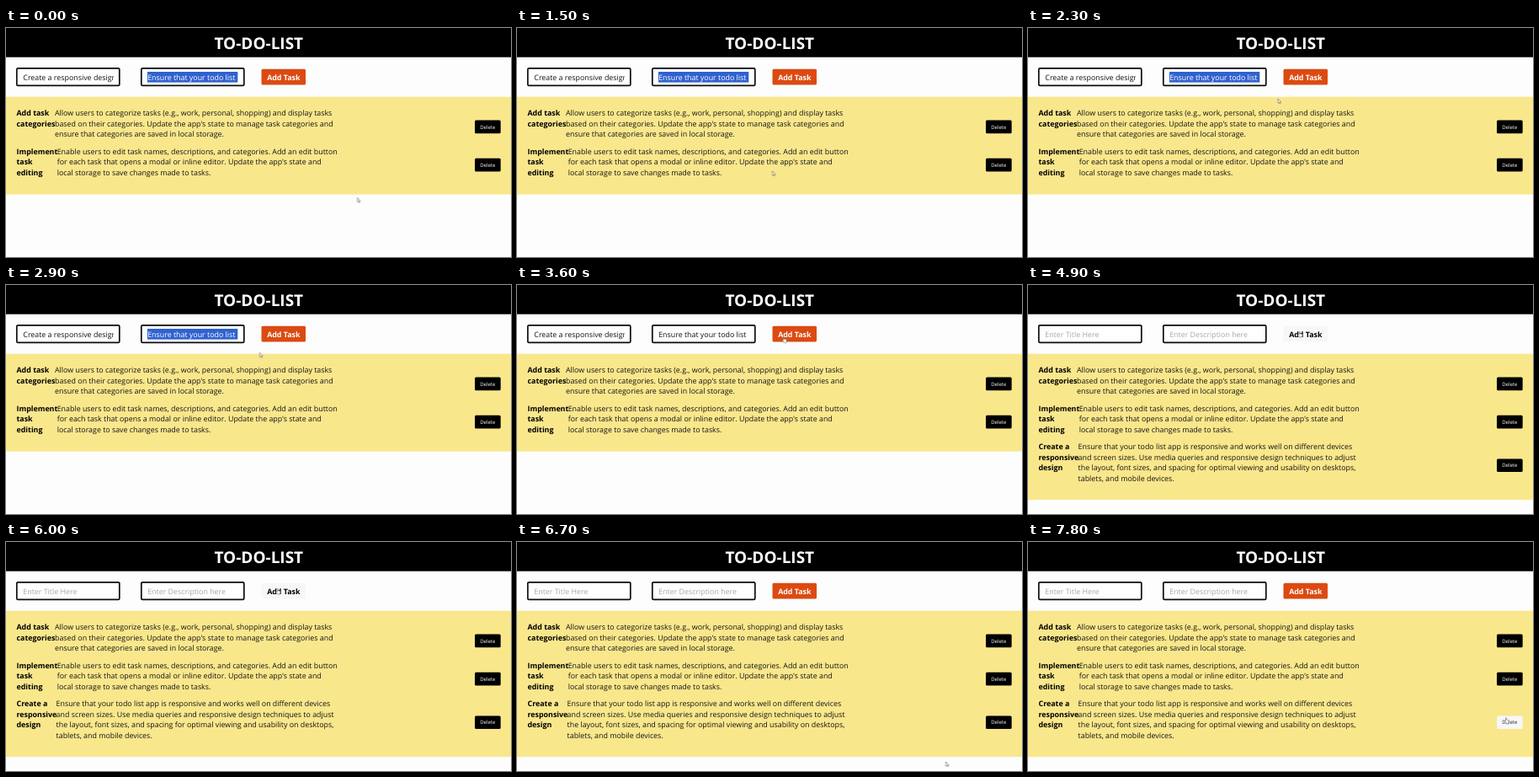
These frames come from a looping animation (600 by 272 pixels, 8 s). An HTML page:

```html
<!DOCTYPE html>
<html lang="en">
<head>
<meta charset="utf-8">
<title>To-do list</title>
<style>
  html, body { margin: 0; width: 100%; height: 100%; overflow: hidden; background: #fdfdfd; }
  svg { display: block; width: 600px; height: 272px; }
  text {
    font: 8.87px "Open Sans", "Noto Sans", sans-serif;
    text-rendering: geometricPrecision;
    fill: #141414;
    white-space: pre;
  }
  .bold text, text.bold { font-weight: 700; fill: #000; }
  text.title { font-size: 19px; font-weight: 700; fill: #fff; text-anchor: middle; }
  .field { fill: #fff; stroke: #0c0c0c; stroke-width: 1.7; }
  text.hint { fill: #a8a8a8; }
  text.mini { font-size: 6px; fill: #fff; text-anchor: middle; }
  text.label { font-weight: 700; text-anchor: middle; fill: #fff; }
  text.marked { fill: #fff; }

  .before, .after, .selected, .plain, .panel, .arrow, .hand {
    animation: 8s step-end infinite;
  }
  .before { animation-name: before; }
  .after { animation-name: after; }
  .selected { animation-name: selected; }
  .plain { animation-name: plain; }
  .panel { animation-name: grow; }
  .arrow { animation-name: arrow; }
  .hand { animation-name: hand; }
  .add { animation: add 8s linear infinite; }
  text.label { animation: addText 8s linear infinite; }
  .last { animation: last 8s linear infinite; }
  text.lastText { animation: lastText 8s linear infinite; }
  .cursor { animation: move 8s linear infinite; }

  @keyframes before { 0% { visibility: visible } 61.25%, 100% { visibility: hidden } }
  @keyframes after { 0% { visibility: hidden } 61.25%, 100% { visibility: visible } }
  @keyframes selected { 0% { visibility: visible } 41.25%, 100% { visibility: hidden } }
  @keyframes plain { 0% { visibility: hidden } 41.25%, 100% { visibility: visible } }
  @keyframes grow { 0% { height: 116px } 61.25%, 100% { height: 173.5px } }
  @keyframes arrow {
    0% { visibility: visible } 44.5% { visibility: hidden }
    78.7% { visibility: visible } 94.5%, 100% { visibility: hidden }
  }
  @keyframes hand {
    0% { visibility: hidden } 44.5% { visibility: visible }
    78.7% { visibility: hidden } 94.5%, 100% { visibility: visible }
  }
  @keyframes add { 0%, 45.2% { fill: #dc4a12 } 47.5%, 78.5% { fill: #f7f7f7 } 80.5%, 100% { fill: #dc4a12 } }
  @keyframes addText { 0%, 45.2% { fill: #fff } 47.5%, 78.5% { fill: #000 } 80.5%, 100% { fill: #fff } }
  @keyframes last { 0%, 94.5% { fill: #000 } 96.5%, 100% { fill: #f7f7f7 } }
  @keyframes lastText { 0%, 94.5% { fill: #fff } 96.5%, 100% { fill: #222 } }
  @keyframes move {
    0%, 6.25% { transform: translate(417.5px, 201.5px) }
    10% { transform: translate(398px, 236px) }
    14% { transform: translate(345px, 212px) }
    18.75% { transform: translate(303.5px, 170px) }
    24% { transform: translate(300px, 122px) }
    28.75% { transform: translate(297px, 84px) }
    37% { transform: translate(302px, 80px) }
    45% { transform: translate(316px, 61.5px) }
    53.75%, 58.7% { transform: translate(320px, 56px) }
    58.75%, 77.5% { transform: translate(321.5px, 55px) }
    79.5% { transform: translate(385px, 120px) }
    83.75% { transform: translate(509.5px, 261px) }
    88% { transform: translate(529px, 249px) }
    94% { transform: translate(563px, 218px) }
    97.5%, 100% { transform: translate(567px, 208.5px) }
  }
</style>
</head>
<body>
<svg viewBox="0 0 600 272">
  <defs>
    <clipPath id="clip1"><rect x="20" y="50" width="108" height="17"/></clipPath>
    <clipPath id="clip2"><rect x="167.5" y="50" width="108" height="17"/></clipPath>
  </defs>

  <rect width="600" height="34.7"/>
  <text class="title" x="300.3" y="25.4">TO-DO-LIST</text>

  <rect class="field" x="12.8" y="47.8" width="122" height="20.6" rx="1.5"/>
  <rect class="field" x="160.8" y="47.8" width="122" height="20.6" rx="1.5"/>
  <g class="before">
    <text x="20.3" y="61.8" clip-path="url(#clip1)">Create a responsive design</text>
  </g>
  <g class="before">
    <g class="selected">
      <rect x="168" y="52" width="107.3" height="12.6" fill="#2f62cf"/>
      <text class="marked" x="168.2" y="61.8" clip-path="url(#clip2)">Ensure that your todo list </text>
    </g>
  </g>
  <g id="typed">
    <text x="168.2" y="61.8" clip-path="url(#clip2)">Ensure that your todo list </text>
  </g>
  <g class="after">
    <text class="hint" x="20.3" y="61.8">Enter Title Here</text>
    <text class="hint" x="168.2" y="61.8">Enter Description here</text>
  </g>
  <rect class="add" x="303.5" y="48.7" width="52.5" height="18.8" rx="1.5"/>
  <text class="label" x="329.8" y="61.8">Add Task</text>

  <rect class="panel" y="81.7" width="600" height="116" fill="#f9e78c"/>
  <g id="tasks"></g>

  <g class="cursor">
    <path class="arrow" d="M0 0V5.2L1.2 4.2 2 6 2.8 5.6 2.1 4H3.6Z" fill="#fff" stroke="#555" stroke-width=".55"/>
    <path class="hand" d="M.4.5Q1-.2 1.5.5V2.8L4 3.3Q4.7 3.6 4.5 4.5L4 7H1.2L-.9 4.3Q-.9 3.5.4 4.1Z" fill="#fff" stroke="#444" stroke-width=".5"/>
  </g>
</svg>
<style>
  #typed { animation: typed 8s step-end infinite; }
  @keyframes typed { 0% { visibility: hidden } 41.25% { visibility: visible } 61.25%, 100% { visibility: hidden } }
  .before .selected { animation-name: marked; }
  @keyframes marked { 0% { visibility: visible } 41.25%, 100% { visibility: hidden } }
</style>
<script>
  const PITCH = 12.6;
  const tasks = [
    { y: 104.2, x: 58, button: 109.6, name: ["Add task", "categories"], text: [
      "Allow users to categorize tasks (e.g., work, personal, shopping) and display tasks",
      "based on their categories. Update the app's state to manage task categories and",
      "ensure that categories are saved in local storage."] },
    { y: 149.5, x: 60.7, button: 154.8, name: ["Implement", "task", "editing"], text: [
      "Enable users to edit task names, descriptions, and categories. Add an edit button",
      "for each task that opens a modal or inline editor. Update the app's state and",
      "local storage to save changes made to tasks."] },
    { y: 194.9, x: 59.6, button: 206.4, name: ["Create a", "responsive", "design"], text: [
      "Ensure that your todo list app is responsive and works well on different devices",
      "and screen sizes. Use media queries and responsive design techniques to adjust",
      "the layout, font sizes, and spacing for optimal viewing and usability on desktops,",
      "tablets, and mobile devices."] }
  ];

  const lines = (list, x, y, cls = "") => list.map((s, i) =>
    `<text class="${cls}" x="${x}" y="${(y + i * PITCH).toFixed(1)}">${s}</text>`).join("");

  document.getElementById("tasks").innerHTML = tasks.map((t, i) => {
    const last = i === tasks.length - 1;
    return `<g class="${last ? "after" : ""}">
      ${lines(t.name, 12.5, t.y, "bold")}${lines(t.text, t.x, t.y)}
      <rect class="${last ? "last" : ""}" x="557" y="${t.button}" width="30.7" height="15.6" rx="1.5"/>
      <text class="mini ${last ? "lastText" : ""}" x="572.3" y="${t.button + 10}">Delete</text>
    </g>`;
  }).join("");
</script>
</body>
</html>
```
